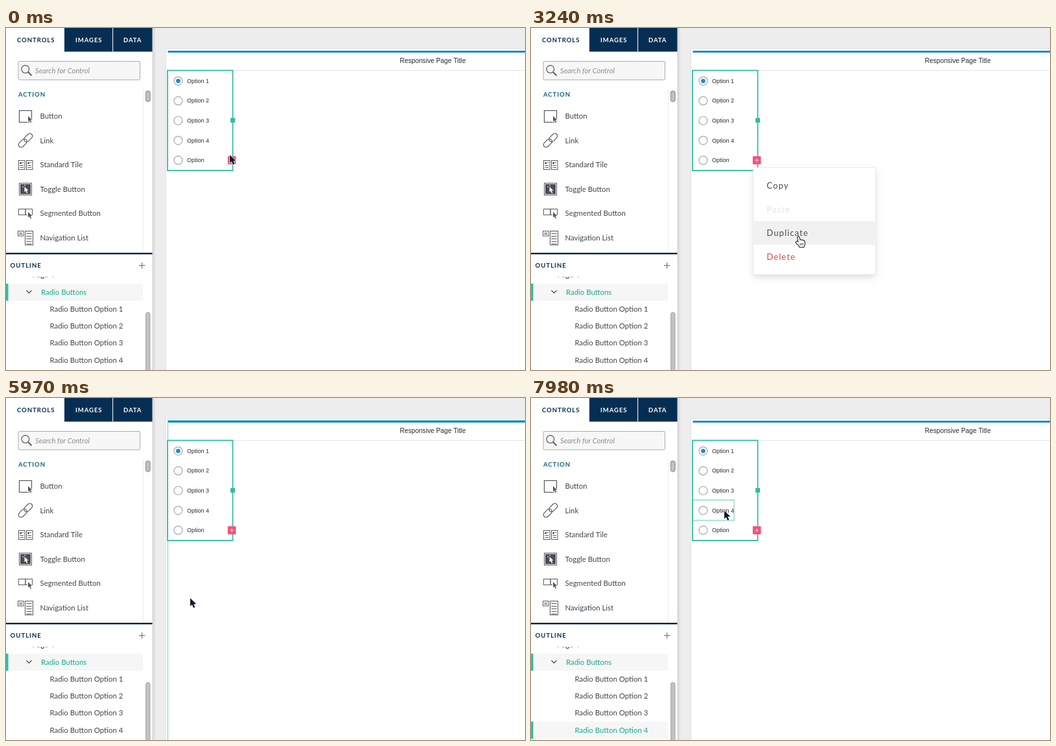
Animation of 800 by 528 pixels, one loop 8 s. Source, as an HTML page with a canvas:

```html
<!DOCTYPE html>
<html lang="en">
<head>
<meta charset="utf-8">
<title>Editor</title>
<style>
html, body { margin: 0; width: 100%; height: 100%; overflow: hidden; background: #ededed; }
canvas { display: block; }
</style>
</head>
<body>
<canvas id="stage" width="800" height="528"></canvas>
<script>
const ctx = document.getElementById('stage').getContext('2d');
const LOOP = 8000;
const NAVY = '#062e52', TEAL = '#2fbda3', INK = '#414449', BLUE = '#1a8ad0', LINE = '#55585e';
const LATO = 'Lato, sans-serif', ARIAL = '"Liberation Sans", Arial, sans-serif';

// Moments of the story
const MENU_OPEN = 1680, MENU_CLOSE = 5820, PAGE_PICK = 6210, GROUP_PICK = 7410, OPTION_HOVER = 7590;

// Pointer hot spot: time, x, y
const PATH = [
  [0, 345, 196], [840, 345, 196], [1500, 342.5, 215], [1860, 342.5, 215],
  [2760, 412, 323], [4080, 412, 323], [4560, 415, 340], [5040, 415, 340],
  [5640, 284, 309], [6420, 284, 309], [7020, 298, 179], [7410, 298, 179], [7740, 298, 174]
];

function pointerAt(t) {
  const i = PATH.findIndex(k => k[0] > t);
  if (i < 0) return PATH[PATH.length - 1].slice(1);
  const [t0, x0, y0] = PATH[i - 1], [t1, x1, y1] = PATH[i];
  const p = (t - t0) / (t1 - t0), e = p * p * (3 - 2 * p);
  return [x0 + (x1 - x0) * e, y0 + (y1 - y0) * e];
}

function rect(x, y, w, h, fill) {
  ctx.fillStyle = fill;
  ctx.fillRect(x, y, w, h);
}

function frame(x, y, w, h, color, width = 1) {
  ctx.strokeStyle = color;
  ctx.lineWidth = width;
  ctx.strokeRect(x, y, w, h);
}

function lines(points, color, width = 1) {
  ctx.strokeStyle = color;
  ctx.lineWidth = width;
  ctx.beginPath();
  points.forEach(([x, y], i) => i ? ctx.lineTo(x, y) : ctx.moveTo(x, y));
  ctx.stroke();
}

function text(str, x, y, font, color, spacing = 0) {
  ctx.font = font;
  ctx.letterSpacing = spacing + 'px';
  ctx.fillStyle = color;
  ctx.fillText(str, x, y);
}

function round(x, y, w, h, r) {
  ctx.beginPath();
  ctx.roundRect(x, y, w, h, r);
}

function circle(x, y, r) {
  ctx.beginPath();
  ctx.arc(x, y, r, 0, Math.PI * 2);
}

const ARROW = new Path2D('M0 0L0 12.6L2.8 10L5 15L7.4 14L5.2 9.2L9.2 9Z');
const HAND = new Path2D('M3 1.4Q4.2 -.4 5.4 1.2L6.4 6Q7.6 4.6 8.8 6Q10 5 11 6.4Q12.6 5.6 13.3 7.4' +
  'L13.9 10.6Q14 12.6 12.8 13.8L12.6 16H6.2L5.4 14L1 9.8Q0 8.2 1.6 7.6Q2.8 7.6 4.6 9.2Z');

function shape(path, x, y, scale, fill, stroke, width = 1) {
  ctx.save();
  ctx.translate(x, y);
  ctx.scale(scale, scale);
  ctx.lineJoin = 'round';
  if (stroke) {
    ctx.strokeStyle = stroke;
    ctx.lineWidth = width;
    ctx.stroke(path);
  }
  ctx.fillStyle = fill;
  ctx.fill(path);
  ctx.restore();
}

function handCursor(x, y) {
  shape(HAND, x - 4, y - 1, 1, '#fff', '#1d2026', 2.2);
  for (const dx of [7, 9, 11]) lines([[x + dx - 4, y + 9], [x + dx - 4, y + 12.5]], '#3a3d44', .9);
}

function chevron(x, y, open) {
  lines(open ? [[x - 4, y - 2], [x, y + 2], [x + 4, y - 2]]
             : [[x - 2, y - 4], [x + 2, y], [x - 2, y + 4]], '#34383f', 1.2);
}

function icons() {
  frame(20.5, 127.5, 19, 18, LINE, 1.2);
  shape(ARROW, 34, 136, .68, LINE, '#fff', 3);

  ctx.save();
  ctx.translate(30, 173.5);
  ctx.rotate(-Math.PI / 4);
  ctx.strokeStyle = LINE;
  ctx.lineWidth = 1.2;
  for (const x of [-13.5, -1.5]) {
    round(x, -4, 15, 8, 4);
    ctx.stroke();
  }
  ctx.restore();

  for (const x of [19.5, 31.5]) {
    frame(x, 204.5, 9.5, 14, LINE);
    rect(x + 2, 207, 2.5, 3, LINE);
    rect(x + 5.5, 207, 2, 1, LINE);
    for (const y of [212, 215]) rect(x + 2, y, 5.5, 1, LINE);
  }

  frame(20.5, 239.5, 19, 18.5, LINE);
  rect(22, 241, 16, 15.5, '#4a4d52');
  shape(ARROW, 28.5, 245, .66, '#fff');
  lines([[25, 244], [27, 246]], '#fff');
  lines([[29, 242], [29, 244]], '#fff');

  frame(19.5, 279.5, 10.5, 9, LINE);
  frame(30, 279.5, 10.5, 9, LINE);
  shape(ARROW, 34, 284, .68, LINE, '#fff', 3);

  frame(18.5, 313.5, 8.5, 7.5, LINE);
  for (const y of [316, 318]) rect(20.5, y, 4.5, 1, LINE);
  frame(29.5, 313.5, 12, 21.5, LINE);
  for (let y = 317; y < 334; y += 4) rect(31.5, y, 8, 1, LINE);
}

function controls() {
  rect(0, 0, 225.5, 528, '#fff');
  rect(90, 0, 135.5, 36.5, NAVY);
  rect(164, 0, 1.2, 36.5, '#dfe5ea');
  const caps = 'bold 9.6px ' + LATO;
  text('CONTROLS', 17, 21.5, caps, NAVY, .9);
  text('IMAGES', 107, 21.5, caps, '#fff', .9);
  text('DATA', 181, 21.5, caps, '#fff', .9);

  round(19, 51.5, 187.5, 28.5, 1.5);
  ctx.fillStyle = '#f7f7f7';
  ctx.fill();
  ctx.strokeStyle = '#a9abae';
  ctx.lineWidth = 1;
  ctx.stroke();
  circle(29.8, 63.6, 5.9);
  ctx.strokeStyle = LINE;
  ctx.lineWidth = 1.2;
  ctx.stroke();
  lines([[34, 68], [39.5, 73.5]], LINE, 1.8);
  text('Search for Control', 45, 69.5, 'italic 11.2px ' + LATO, '#8a8d91');

  text('ACTION', 19, 106.3, caps, '#17667a', .9);
  rect(211, 94, 1, 253, '#ececec');
  round(215.5, 97.5, 6.5, 16, 3.2);
  ctx.fillStyle = '#c2c2c2';
  ctx.fill();
  ctx.strokeStyle = '#a6a6a6';
  ctx.stroke();

  ['Button', 'Link', 'Standard Tile', 'Toggle Button', 'Segmented Button', 'Navigation List']
    .forEach((name, i) => text(name, 52.5, 140 + i * 37.6, '11.4px ' + LATO, INK));
  icons();

  rect(0, 347, 225.5, 2.4, '#0a2340');
  text('OUTLINE', 6.5, 370.3, caps, NAVY, 1);
  rect(205, 366.2, 9.5, 1, '#5b6068');
  rect(209.2, 362, 1, 9.5, '#5b6068');
}

function row(label, x, y, o = {}) {
  if (o.lit) {
    rect(0, y - 13, o.width, 26.3, '#f6f6f6');
    rect(0, y - 13, 3.5, 26.3, TEAL);
  }
  if (o.arrow) chevron(x - 18.5, y - .5, o.arrow === 'open');
  text(label, x, y + 4, (o.bold ? 'bold ' : '') + '11.4px ' + LATO, o.teal ? '#16a88c' : o.bold ? '#2b3038' : INK);
}

function outline(s) {
  const step = 26.25;
  ctx.save();
  ctx.beginPath();
  ctx.rect(0, 384.5, 225.5, 144);
  ctx.clip();
  if (s.pagePicked) {
    const y = 398.2, width = 225.5;
    row('Page 2', 40.5, y, { bold: true, arrow: 'shut' });
    row('Page 3', 40.5, y + step, { bold: true, arrow: 'shut' });
    row('Page 4', 40.5, y + 2 * step, { bold: true, arrow: 'open', lit: true, width });
    row('Radio Buttons', 54, y + 3 * step, { arrow: 'shut', lit: s.groupHover, teal: s.groupHover, width });
    row('Footer', 54, y + 4 * step);
  } else {
    const y = 407.7, width = 211;
    row('Page 4', 40.5, y - step, { bold: true });
    row('Radio Buttons', 54, y, { arrow: 'open', lit: true, teal: true, width });
    for (let i = 1; i <= 4; i++) {
      const on = i === 4 && s.optionHover;
      row('Radio Button Option ' + i, 67.5, y + i * step, { lit: on, teal: on, width });
    }
    round(215.5, 439, 6.5, 110, 3.2);
    ctx.fillStyle = '#c2c2c2';
    ctx.fill();
    ctx.strokeStyle = '#a6a6a6';
    ctx.lineWidth = 1;
    ctx.stroke();
  }
  ctx.restore();
}

function page(s) {
  rect(0, 0, 800, 528, '#ededed');
  const shade = ctx.createLinearGradient(225, 0, 231, 0);
  shade.addColorStop(0, '#cfcfcf');
  shade.addColorStop(1, '#ededed');
  rect(225, 0, 6, 528, shade);
  rect(246, 31.5, 554, 497, '#e2e2e2');
  rect(247, 32.5, 553, 496, '#fff');
  rect(249.5, 35, 551, 3, BLUE);
  rect(249.5, 65, 551, 1, '#e3e3e3');
  text('Responsive Page Title', 607, 53.5, '10.2px ' + ARIAL, '#2a2a2a');
  if (s.pageHover) frame(249.5, 34.5, 700, 700, '#68d0be');
  if (s.pagePicked) {
    rect(248.5, 35, 2.6, 493, TEAL);
    rect(248.5, 35, 552, 3, '#1a9fa5');
  }
}

function group(s) {
  ['Option 1', 'Option 2', 'Option 3', 'Option 4', 'Option'].forEach((label, i) => {
    const y = 81.8 + i * 30.6;
    circle(265.4, y, 6.5);
    ctx.strokeStyle = '#a5a7aa';
    ctx.lineWidth = 1.2;
    ctx.stroke();
    if (!i) {
      circle(265.4, y, 3.3);
      ctx.fillStyle = BLUE;
      ctx.fill();
    }
    text(label, 279, y + 2.9, '9px ' + ARIAL, '#2a2a2a');
  });
  if (s.groupHover) frame(249.5, 65.5, 99.5, 154, '#5fcdb9');
  if (s.optionHover) frame(249.5, 157.5, 63.5, 31.5, '#5fcdb9');
  if (s.pagePicked) return;
  frame(249, 65.5, 100.5, 154.5, TEAL, 1.8);
  rect(346, 139, 7, 7, TEAL);
  round(341.8, 198, 12.6, 12.4, 1);
  ctx.fillStyle = s.plusHover ? '#e4576c' : '#f2527b';
  ctx.fill();
  rect(345.3, 203.7, 5.6, 1, '#ffd5e0');
  rect(347.6, 201.4, 1, 5.6, '#ffd5e0');
}

function menu(y, inside) {
  ctx.save();
  ctx.shadowColor = 'rgba(0,0,0,.13)';
  ctx.shadowBlur = 10;
  ctx.shadowOffsetY = 4;
  rect(342.5, 216, 188.5, 164.5, '#fff');
  ctx.restore();
  frame(342.5, 215.5, 188.5, 165, '#ececec');
  const items = [['Copy', '#4c4c4c', '#f1f1f1'], ['Paste', '#e4e4e4', '#fff'],
    ['Duplicate', '#4c4c4c', '#f1f1f1'], ['Delete', '#cf4b3d', '#f8dfd9']];
  items.forEach(([label, color, glow], i) => {
    const top = 225 + i * 36.5;
    if (inside && y >= top && y < top + 36.5) rect(342.5, top, 188.5, 36.5, glow);
    text(label, 363.3, top + 23.3, '13px ' + LATO, color, 1.1);
  });
}

function draw(t) {
  const [x, y] = pointerAt(t);
  const menuOpen = t >= MENU_OPEN && t < MENU_CLOSE;
  const overGroup = x >= 249 && x <= 350 && y >= 65 && y <= 220;
  const inMenu = menuOpen && x > 345 && x < 531 && y > 216 && y < 381;
  const pagePicked = t >= PAGE_PICK && t < GROUP_PICK;
  const s = {
    pagePicked,
    pageHover: t >= MENU_CLOSE && t < PAGE_PICK,
    groupHover: pagePicked && overGroup,
    optionHover: t >= OPTION_HOVER,
    plusHover: !menuOpen && x > 342 && x < 354 && y > 194 && y < 210
  };
  page(s);
  group(s);
  controls();
  outline(s);
  if (menuOpen) menu(y, inMenu);
  if (inMenu) handCursor(x, y);
  else shape(ARROW, x, y, 1, '#0d1b33', 'rgba(255,255,255,.85)', 1.6);
}

const start = performance.now();
function tick() {
  draw((performance.now() - start) % LOOP);
  requestAnimationFrame(tick);
}
tick();
</script>
</body>
</html>
```
